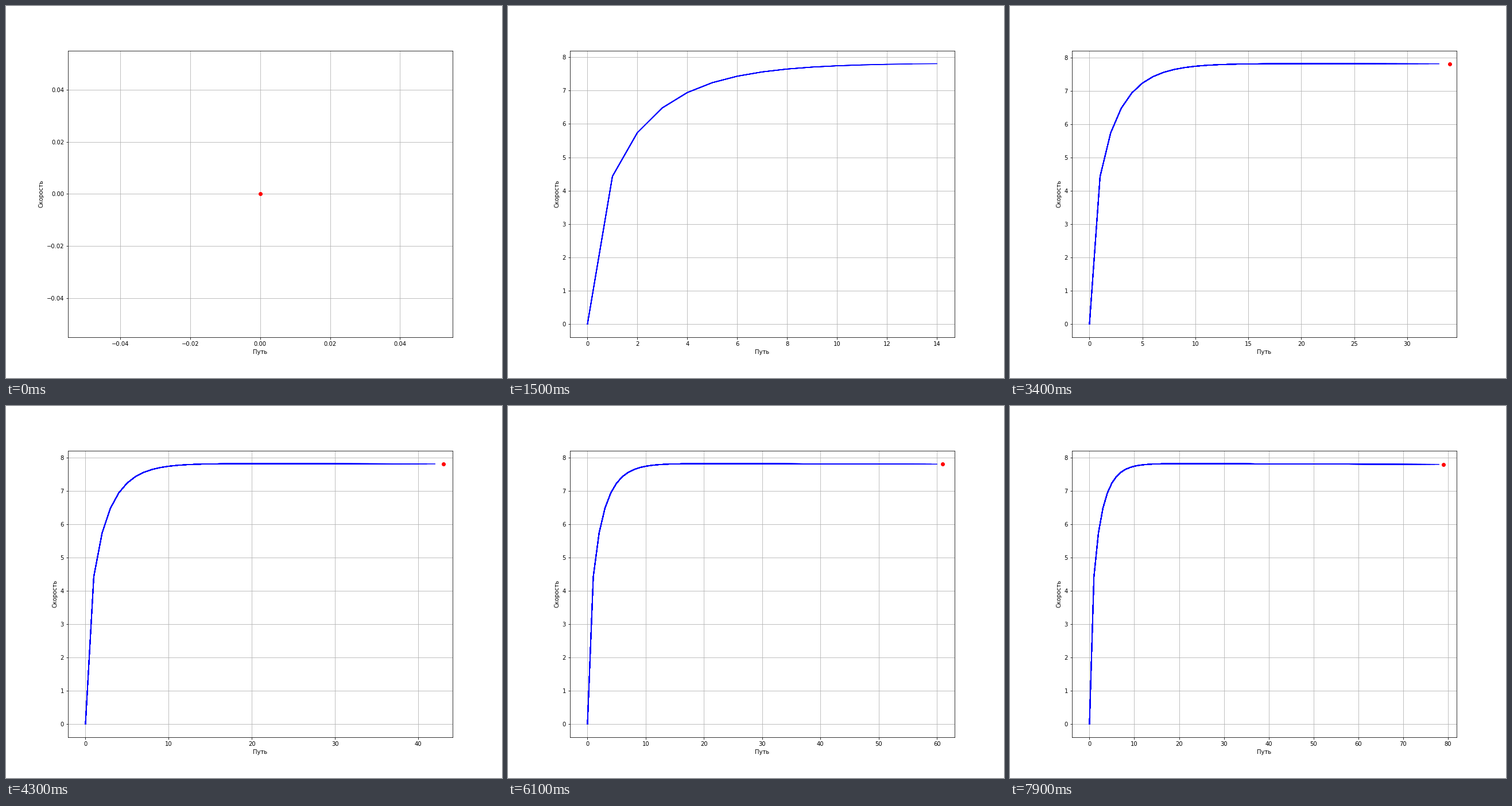
A matplotlib script that plays this animation: 864x648 px, repeating every 8 s.

```python
import math

import matplotlib.pyplot as plt
from matplotlib.animation import FuncAnimation

FRAMES = 80
G = 9.81
DRAG = 0.32      # share of v^2 lost per metre at the start height
SCALE = 9500     # height over which the air density changes e-fold


def fall_speeds(n):
    """Speed after each metre of a fall through slowly thickening air."""
    speeds = [0.0]
    for x in range(n - 1):
        v2 = speeds[-1] ** 2
        speeds.append(math.sqrt(v2 + 2 * G - DRAG * math.exp(x / SCALE) * v2))
    return speeds


path = list(range(FRAMES))
speed = fall_speeds(FRAMES)

fig, ax = plt.subplots(figsize=(12, 9), dpi=72)
ax.set_xlabel("Путь")
ax.set_ylabel("Скорость")
ax.grid(True)

dot, = ax.plot([0], [0], "ro")
# Every step lays one longer line over the earlier ones.
trails = [ax.plot(path[:n], speed[:n], "b-", visible=False)[0]
          for n in range(2, FRAMES)]


def limits(values):
    top = max(values, default=0)
    return (-0.05 * top, 1.05 * top) if top else (-0.055, 0.055)


def update(i):
    dot.set_data([path[i]], [speed[i]])
    for n, line in enumerate(trails, start=2):
        line.set_visible(n <= i)
    ax.set_xlim(*limits(path[:i]))
    ax.set_ylim(*limits(speed[:i]))
    return [dot, *trails]


anim = FuncAnimation(fig, update, frames=FRAMES, interval=100,
                     repeat=True, repeat_delay=0, blit=False)
plt.show()
```
